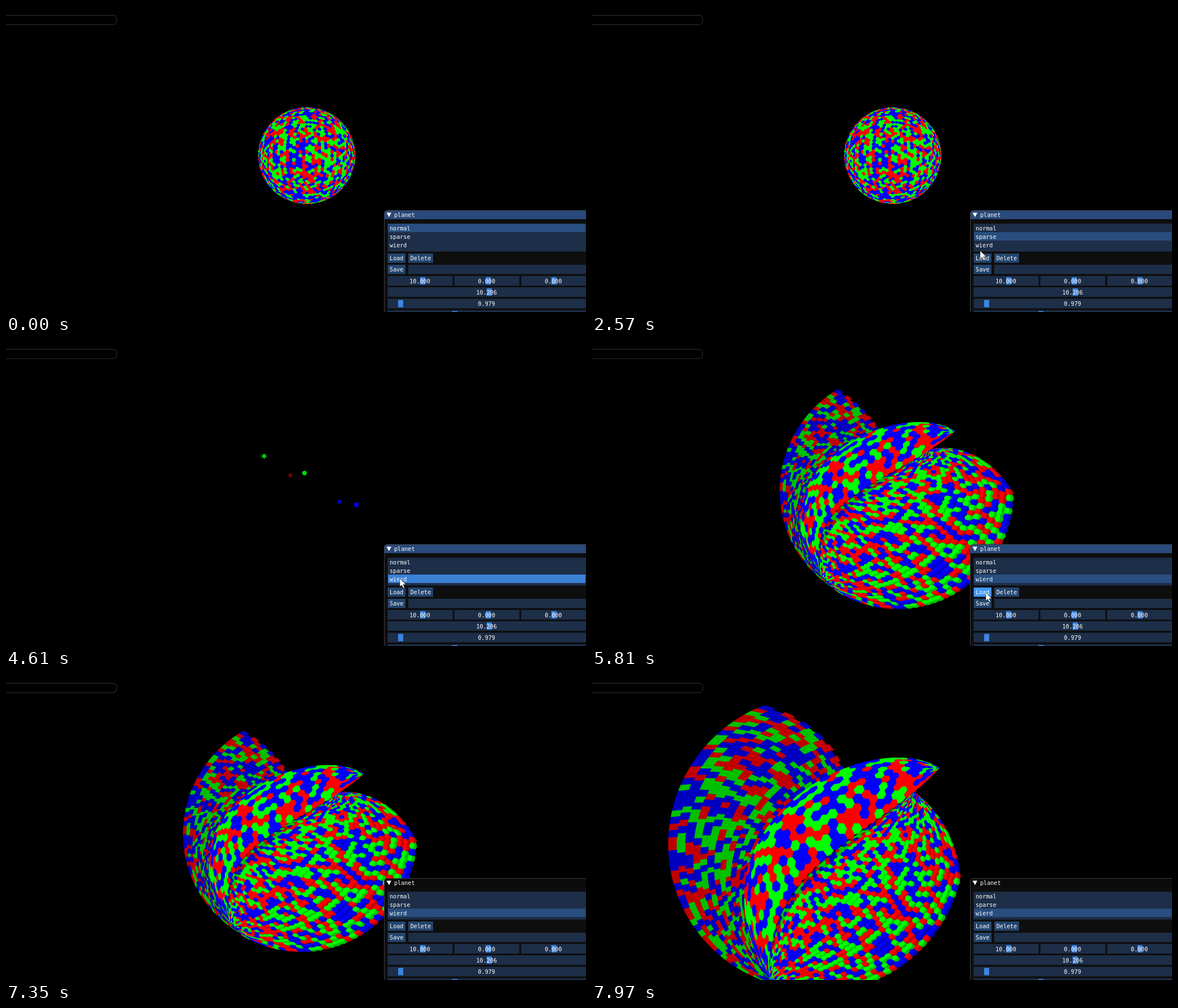
Animation, 1028 px wide and 544 px high, one loop 8 s. Source, as an HTML page with a canvas:

```html
<!DOCTYPE html>
<html lang="en">
<head>
<meta charset="utf-8">
<title>planet</title>
<style>
html, body { margin: 0; width: 100%; height: 100%; overflow: hidden; background: #000; }
canvas, svg { position: absolute; left: 0; top: 0; width: 1028px; height: 544px; }
text { font: 10.1px "DejaVu Sans Mono", monospace; fill: #fff; white-space: pre; }
</style>
</head>
<body>
<canvas id="stage" width="1028" height="544"></canvas>
<svg id="ui" viewBox="0 0 1028 544"></svg>
<script>
const LOOP = 8000;
const ctx = document.getElementById('stage').getContext('2d');
const ui = document.getElementById('ui');
const clamp = (x, a = 0, b = 1) => Math.max(a, Math.min(b, x));
const mix = (a, b, f) => a + (b - a) * f;
const within = (x, a, b) => x >= a && x < b;

function pick(i, j, seed) {
  const h = Math.sin(i * 127.1 + j * 311.7 + seed * 74.7) * 43758.5453;
  return Math.floor((h - Math.floor(h)) * 3);
}

/* ---------- panel ---------- */
const FRAME = '#1d2e48', BUTTON = '#23456d', GRAB = '#3d85e0';
const rect = (x, y, w, h, fill, id = '') =>
  `<rect ${id && `id="${id}"`} x="${x}" y="${y}" width="${w}" height="${h}" fill="${fill}"/>`;
const label = (x, y, s, anchor = 'start') =>
  `<text x="${x}" y="${y}" text-anchor="${anchor}">${s}</text>`;
const slider = (x, y, w, grab, s) =>
  rect(x, y, w, 17, FRAME) + rect(grab, y + 2, 9, 13, GRAB) + label(x + w / 2 - 0.5, y + 12.5, s, 'middle');
const button = (x, y, w, s, id) => rect(x, y, w, 16.5, BUTTON, id) + label(x + w / 2, y + 12.3, s, 'middle');
const rowTop = i => 387 + 15 * i;

ui.innerHTML =
  '<rect x="-20" y="16.5" width="216" height="16.5" rx="6" fill="none" stroke="#37373e"/>' +
  '<path d="M1030 363.5H676.5Q670.5 363.5 670.5 369.5V550H1030Z" fill="#0e0e0e"/>' +
  '<path id="bar" d="M1030 363.5H676.5Q670.5 363.5 670.5 369.5V379H1030Z"/>' +
  '<path d="M1030 363.5H676.5Q670.5 363.5 670.5 369.5V550" fill="none" stroke="#3e3e47"/>' +
  '<path d="M674.5 367.5H683L678.8 375.3Z" fill="#fff"/>' + label(688, 375, 'planet') +
  rect(676.5, 387, 351.5, 49.5, FRAME) +
  ['normal', 'sparse', 'wierd'].map((s, i) =>
    rect(677, rowTop(i), 350, 15, 'none', 'row' + i) + label(680, rowTop(i) + 11.6, s)).join('') +
  button(676.5, 440, 31.5, 'Load', 'load') + button(713, 440, 44, 'Delete') +
  button(676.5, 460, 31.5, 'Save') + rect(713, 460, 315, 16.5, FRAME) +
  ['10.000', '0.000', '0.000'].map((s, i) =>
    slider(676.5 + 118.3 * i, 480, 115, 734 + 116.3 * i, s)).join('') +
  slider(676.5, 500, 351.5, 852, '10.206') + slider(676.5, 520.5, 351.5, 695, '0.979') +
  rect(676.5, 541, 351.5, 3, FRAME) + rect(791, 542.5, 9, 2, GRAB) +
  '<path id="arrow" d="M0 0V14.6L3.4 11.6L5.9 17L8.2 16L5.8 10.7H10.6Z" fill="#fff" stroke="#000" stroke-width=".5"/>';

const el = id => document.getElementById(id);

// Each move: start, end, target x, target y.
const moves = [
  [660, 1430, 691, 409], [1500, 1570, 691, 404], [2110, 2540, 688, 435], [2600, 2740, 690, 440],
  [3880, 4090, 698, 424], [4670, 4920, 698, 449], [6340, 6480, 668, 468], [6480, 6860, 251, 258]
];

function cursorAt(t) {
  let x = 926, y = 533;
  for (const [from, to, tx, ty] of moves) {
    const f = clamp((t - from) / (to - from)), ease = f * (2 - f);
    x = mix(x, tx, ease);
    y = mix(y, ty, ease);
  }
  return [x, y];
}

function drawPanel(t) {
  const shown = within(t, 660, 6890);
  const [x, y] = cursorAt(660 + Math.floor((t - 660) / 70) * 70);
  el('arrow').setAttribute('visibility', shown ? 'visible' : 'hidden');
  el('arrow').setAttribute('transform', `translate(${x.toFixed(1)} ${y.toFixed(1)})`);
  el('bar').setAttribute('fill', t < 6890 ? '#294a7a' : '#0a0a0a');

  const selected = t < 1960 ? 0 : t < 4470 ? 1 : 2;
  const live = shown && t >= 1960;
  for (let i = 0; i < 3; i++) {
    const over = live && x > 677 && within(y, rowTop(i), rowTop(i + 1));
    el('row' + i).setAttribute('fill', over ? '#3b82d6' : i === selected ? '#294e7f' : 'none');
  }
  const over = live && within(x, 677, 708) && within(y, 439.9, 456);
  const down = within(t, 3030, 3090) || within(t, 5280, 5350);
  el('load').setAttribute('fill', down ? '#0f87fa' : over ? '#4296fa' : BUTTON);
}

/* ---------- hexagon globe ---------- */
function globePoints(n) {
  const g = (1 + Math.sqrt(5)) / 2, ico = [], found = new Map();
  for (const a of [-1, 1]) for (const b of [-g, g]) ico.push([0, a, b], [a, b, 0], [b, 0, a]);
  const near = (p, q) => Math.abs(Math.hypot(p[0] - q[0], p[1] - q[1], p[2] - q[2]) - 2) < 0.01;
  ico.forEach((p, a) => ico.forEach((q, b) => ico.forEach((r, c) => {
    if (!(a < b && b < c && near(p, q) && near(q, r) && near(p, r))) return;
    for (let i = 0; i <= n; i++) for (let j = 0; j <= n - i; j++) {
      const v = [0, 1, 2].map(k => p[k] * i + q[k] * j + r[k] * (n - i - j));
      const len = Math.hypot(...v), u = v.map(e => e / len);
      found.set(u.map(e => Math.round(e * 1000)).join(), u);
    }
  })));
  return [...found.values()];
}

function makeGlobe(size) {
  const img = ctx.createImageData(size, size), R = size / 2;
  const pts = globePoints(16).filter(p => p[2] > -0.1);
  for (let py = 0; py < size; py++) for (let px = 0; px < size; px++) {
    const x = (px + 0.5 - R) / R, y = (py + 0.5 - R) / R, d = x * x + y * y;
    if (d > 1) continue;
    const z = Math.sqrt(1 - d);
    let best = -2, cell = 0;
    for (let k = 0; k < pts.length; k++) {
      const p = pts[k], dot = p[0] * x + p[1] * y + p[2] * z;
      if (dot > best) { best = dot; cell = k; }
    }
    const o = (py * size + px) * 4;
    img.data[o + pick(cell, 3, 5)] = 255;
    img.data[o + 3] = 255;
  }
  return img;
}
const globe = makeGlobe(172);

/* ---------- scattered cells ---------- */
function drawSpeck(x, y, r, sides, color) {
  ctx.fillStyle = color;
  ctx.beginPath();
  for (let k = 0; k < sides; k++) {
    const a = (k + 0.5 * (sides > 4)) / sides * 2 * Math.PI;
    ctx.lineTo(x + r * Math.cos(a), y + r * Math.sin(a));
  }
  ctx.fill();
}

function drawSpecks() {
  drawSpeck(457.5, 206.5, 5, 4, '#00c000');
  drawSpeck(504, 240.5, 3.7, 6, '#800000');
  drawSpeck(529, 236.5, 4.5, 6, '#00d800');
  drawSpeck(591, 287.5, 4, 6, '#0000c0');
  drawSpeck(621, 293, 5, 6, '#0000d8');
}

/* ---------- folded shell ---------- */
const HEX = [[0, -2 / 3], [0.5, -1 / 3], [0.5, 1 / 3], [0, 2 / 3], [-0.5, 1 / 3], [-0.5, -1 / 3]];
const QUAD = [[-0.5, -0.5], [0.5, -0.5], [0.5, 0.5], [-0.5, 0.5]];
const DIM = ['#c00000', '#00c000', '#0000c0'], BRIGHT = ['#f00', '#0f0', '#00f'];

const polar = (deg, r) => [r * Math.cos(deg * Math.PI / 180), r * Math.sin(deg * Math.PI / 180)];
const angle = ([x, y]) => (Math.atan2(y, x) * 180 / Math.PI + 360) % 360;
const blend = (p, q, f) => [mix(p[0], q[0], f), mix(p[1], q[1], f)];

function bezier(a, b, c, d, t) {
  const s = 1 - t;
  return [0, 1].map(k => s * s * s * a[k] + 3 * s * s * t * b[k] + 3 * s * t * t * c[k] + t * t * t * d[k]);
}

function paint(paths, colors) {
  paths.forEach((p, k) => {
    ctx.fillStyle = ctx.strokeStyle = colors[k];
    ctx.fill(p);
    ctx.stroke(p);
  });
}

// Tiles a surface (u, v) -> [x, y]; lit(v) is the bright share of each tile.
function tile(surface, { cols, rows, shape, seed, lit }) {
  const dim = [0, 1, 2].map(() => new Path2D()), bright = [0, 1, 2].map(() => new Path2D());
  const add = (out, i, j, share) => {
    shape.forEach(([du, dv], k) => {
      const u = clamp((i + 0.5 + (j % 2) / 2 + du) / cols);
      const v = clamp((j + 0.5 + dv * share - (1 - share) * 0.5) / rows);
      out[k ? 'lineTo' : 'moveTo'](...surface(u, v));
    });
    out.closePath();
  };
  for (let j = 0; j < rows; j++) for (let i = shape === HEX ? -1 : 0; i < cols; i++) {
    const color = pick(i, j, seed), share = lit((j + 0.5) / rows);
    if (share < 1) add(dim[color], i, j, 1);
    if (share > 0) add(bright[color], i, j, share);
  }
  paint(dim, DIM);
  paint(bright, BRIGHT);
}

// The outline is a circle; the ridge in front of it slides by parallax as the camera turns.
function drawShell(turn) {
  const cx = 540 - 143 * turn, cy = 275 + 133 * turn - 98 * turn * turn;
  const size = 206 + 54 * turn ** 3;
  const place = ([x, y]) => [cx + size * x, cy + size * y];
  const slide = ([x, y], t, lean) =>
    [x - (1 - turn) * (0.34 + lean * Math.sin(Math.PI * t)), y - (1 - turn) * 0.2 * t * t];

  const tip = [0.84, -0.55], foot = [-0.32, 0.88];
  const crest = t => slide(bezier(tip, [0.35, -0.85], [-0.95, -0.15], foot, t), t, 0);
  const valley = t => slide(bezier(tip, [0.45, -0.1], [-0.35, 0.1], foot, t), t, 0.1);
  const cusp = mix(122, 108, turn);

  const fan = (u, v) => {
    const inner = crest(mix(0.33, 1, u));
    const f = 1 - (1 - v) ** 1.25;
    return place(polar(mix(mix(mix(241, 250, turn), cusp, u), angle(inner), f),
      mix(mix(1.04, 0.97, u), Math.hypot(...inner), f)));
  };

  const notch = valley(0.13), from = angle(notch) - 360, reach = Math.hypot(...notch);
  const bowl = (u, v) => {
    const rim = polar(mix(from, cusp, u), mix(reach, mix(1.02, 0.98, u), Math.min(1, u / 0.3)));
    return place(blend(valley(mix(0.13, 1, u)), rim, v ** 1.2));
  };

  const ridge = (u, v) =>
    place(blend(crest(u), valley(u), 0.3 * v + 0.7 * (1 - Math.cos(v * Math.PI / 2))));

  ctx.lineWidth = 0.8;
  ctx.lineJoin = 'bevel';
  tile(fan, { cols: 54, rows: 13, shape: QUAD, seed: 2, lit: () => 0 });
  tile(bowl, { cols: 54, rows: 24, shape: HEX, seed: 9, lit: v => v < 0.1 ? 0 : 1 - 0.55 * v });
  tile(ridge, { cols: 32, rows: 10, shape: HEX, seed: 4, lit: () => 1 });
}

/* ---------- playback ---------- */
const STEP = 68.2;
let lastKey = '';

function drawPlanet(t) {
  const mode = t < 3090 ? 'globe' : t < 5810 ? 'specks' : 'shell';
  const step = t < 7220 ? -1 : Math.floor((t - 7220) / STEP + 0.1);
  const key = mode + step;
  if (key === lastKey) return;
  lastKey = key;
  ctx.fillStyle = '#000';
  ctx.fillRect(0, 0, 1028, 544);
  if (mode === 'globe') ctx.putImageData(globe, 447, 180);
  else if (mode === 'specks') drawSpecks();
  else drawShell(step < 0 ? 0 : (step * STEP - 43) / 707);
}

const start = performance.now();
function play() {
  const t = (performance.now() - start) % LOOP;
  drawPlanet(t);
  drawPanel(t);
  requestAnimationFrame(play);
}
play();
</script>
</body>
</html>
```
